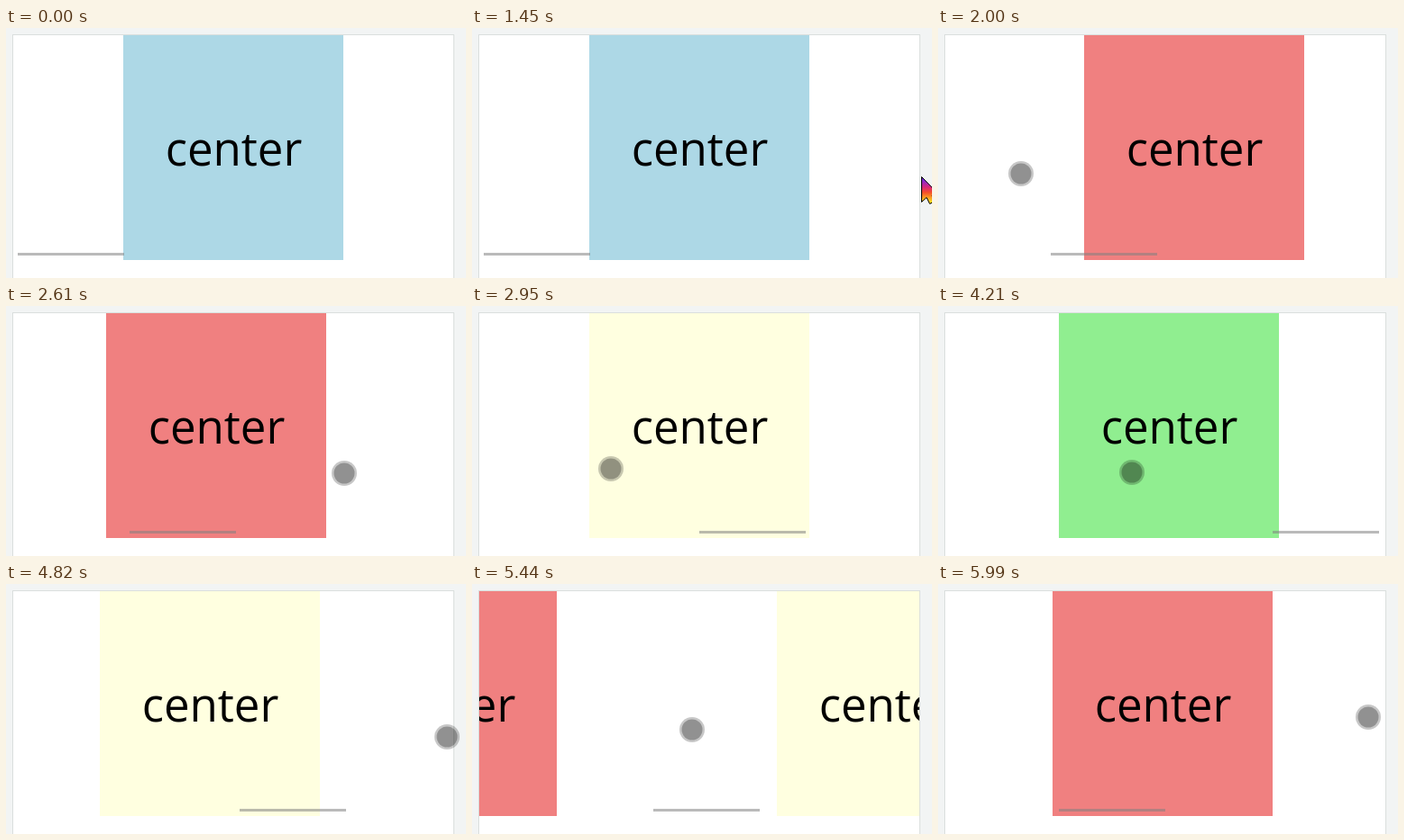
These frames come from a looping animation (510x278 px, 6060 ms). An HTML page:

```html
<!DOCTYPE html>
<html lang="en">
<head>
<meta charset="utf-8">
<title>Snap scroller</title>
<style>
  html, body { margin: 0; width: 100%; height: 100%; overflow: hidden; background: #f2f4f4; }
  svg { display: block; width: 510px; height: 278px; }
  text { font: 51px "Open Sans", "Noto Sans", sans-serif; text-anchor: middle; }
</style>
</head>
<body>
<svg viewBox="0 0 510 278">
  <defs>
    <clipPath id="view"><rect x="8" y="8" width="488" height="250"/></clipPath>
    <linearGradient id="rainbow" x1="0" y1="0" x2="0" y2="1">
      <stop offset=".1" stop-color="#7a2be0"/>
      <stop offset=".38" stop-color="#d8267c"/>
      <stop offset=".58" stop-color="#f4502a"/>
      <stop offset=".9" stop-color="#ffd21f"/>
    </linearGradient>
  </defs>
  <rect x="7.5" y="7.5" width="489" height="290" fill="#fff" stroke="#dadfdd"/>
  <g clip-path="url(#view)">
    <g id="strip"></g>
    <rect id="thumb" y="250" width="118" height="3" fill="#808080" fill-opacity=".54"/>
  </g>
  <g id="touch">
    <circle r="14" fill-opacity=".22"/>
    <circle r="11.5" fill-opacity=".27"/>
  </g>
  <path id="arrow" d="M498.5 165.5V193.5L504 188.5L507.5 195.5L513 193L510 186.5H519Z"
        fill="url(#rainbow)" stroke="#000"/>
</svg>
<script>
const LOOP = 6060, START = 1450, STEP = 68.8, PAGE = 488;
const DRAGGED = 0.8; // share of a page covered before release
const $ = id => document.getElementById(id);
const strip = $('strip'), thumb = $('thumb'), touch = $('touch'), arrow = $('arrow');

strip.innerHTML = ['lightblue', 'lightcoral', 'lightyellow', 'lightgreen'].map((color, i) =>
  `<g transform="translate(${i * PAGE})">
     <rect x="130" y="8" width="244" height="250" fill="${color}"/>
     <text x="252.5" y="153">center</text>
   </g>`).join('');

// Times are in steps of the screen refresh.
const swipes = [
  { start: 1, drag: 4, snap: 7, dir: 1 },
  { start: 16.6, drag: 3, snap: 2.4, dir: 1 },
  { start: 29.6, drag: 4.8, snap: 7, dir: 1 },
  { start: 41, drag: 4.6, snap: 7, dir: -1 },
  { start: 55.6, drag: 4.6, snap: 7, dir: -1 }
];

// Turning points of the finger
const turns = [
  { at: 1, x: 475, y: 178 },
  { at: 5.55, x: 15, y: 156 },
  { at: 14, x: 394, y: 186 },
  { at: 16.6, x: 394, y: 186 },
  { at: 19.2, x: 98, y: 179 },
  { at: 28, x: 331, y: 186 },
  { at: 29.6, x: 331, y: 186 },
  { at: 34.1, x: 70, y: 193 },
  { at: 49, x: 489, y: 170 },
  { at: 55, x: 180, y: 166 },
  { at: 65, x: 477, y: 148 }
];

const clamp = u => Math.min(1, Math.max(0, u));
const smooth = u => u * u * (3 - 2 * u);
const easeOut = u => 1 - (1 - u) ** 2;
const mix = (a, b, u) => a + (b - a) * u;

function scrollAt(k) {
  let pages = 0;
  for (const { start, drag, snap, dir } of swipes) {
    const pull = smooth(clamp((k - start) / drag));
    const settle = easeOut(clamp((k - start - drag) / snap));
    pages += dir * mix(DRAGGED * pull, 1, settle);
  }
  return pages * PAGE;
}

function touchAt(k) {
  const next = turns.findIndex(turn => turn.at > k);
  if (next < 1) return turns.at(next);
  const a = turns[next - 1], b = turns[next];
  const u = smooth((k - a.at) / (b.at - a.at));
  return { x: mix(a.x, b.x, u), y: mix(a.y, b.y, u) };
}

const show = (el, on) => el.setAttribute('visibility', on ? 'visible' : 'hidden');
const move = (el, x, y = 0) =>
  el.setAttribute('transform', `translate(${Math.round(x)} ${Math.round(y)})`);

function draw(now) {
  const t = now % LOOP;
  const k = t < START ? -1 : Math.floor((t - START + 16) / STEP);
  const scroll = scrollAt(k), finger = touchAt(k);
  move(strip, -scroll);
  move(thumb, 13.4 + scroll / PAGE * 119.4);
  move(touch, finger.x, finger.y);
  show(touch, k > 0);
  show(arrow, k === 0);
}

let origin;
function tick(now) {
  origin ??= now;
  draw(now - origin);
  requestAnimationFrame(tick);
}
draw(0);
requestAnimationFrame(tick);
</script>
</body>
</html>
```
